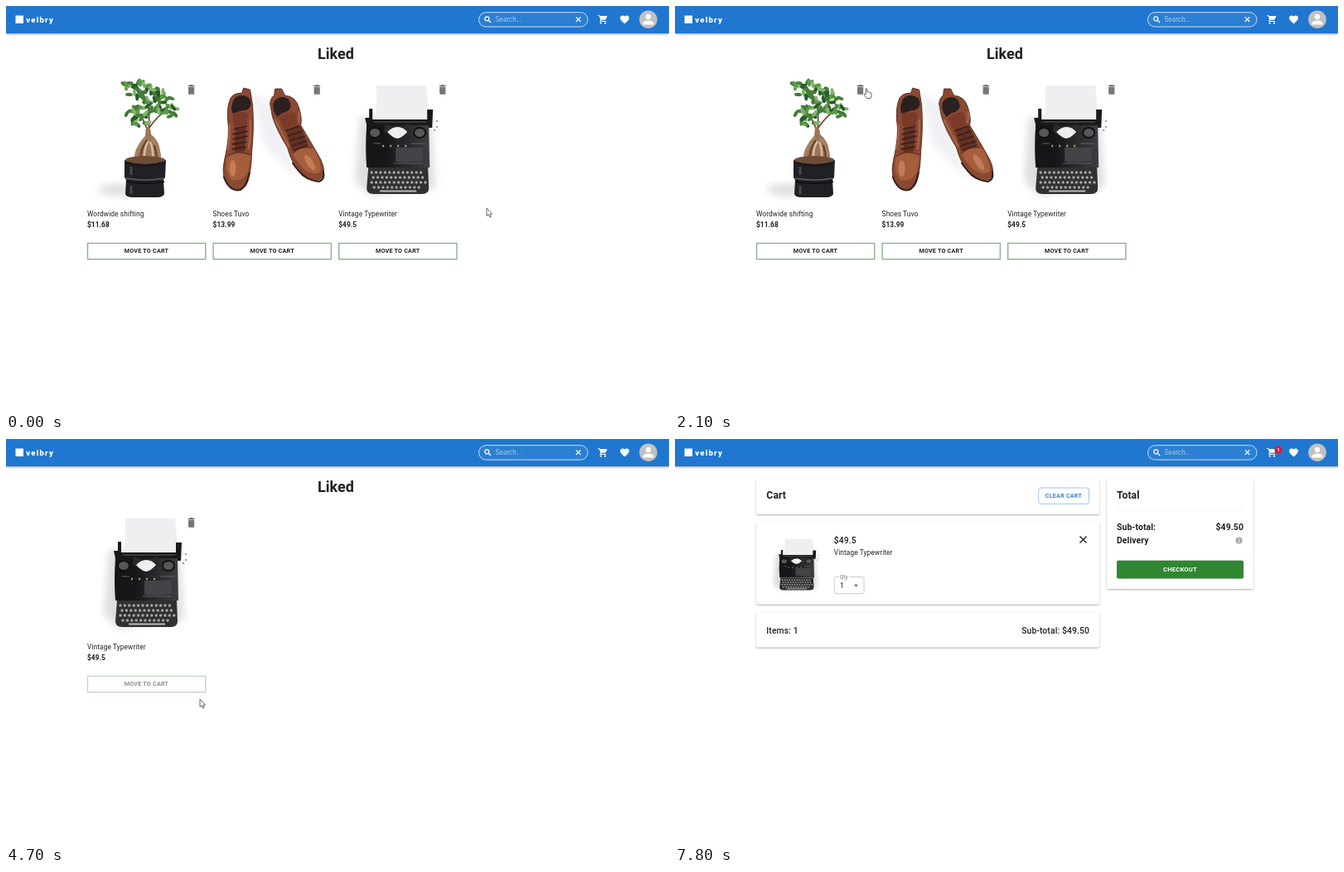
Write an HTML page that moves like this. It is 800x489 px and loops after 8400 ms.

```html
<!DOCTYPE html>
<html lang="en">
<head>
<meta charset="utf-8">
<title>Shop: liked items and cart</title>
<style>
html, body { margin: 0; width: 100%; height: 100%; overflow: hidden; background: #fff; }
svg { display: block; }
#stage { width: 100vw; height: 100vh; font-family: Roboto, sans-serif; fill: #212121; }
.name { font-size: 8.35px; letter-spacing: .09px; }
.price { font-size: 8.4px; font-weight: 700; letter-spacing: .05px; }
.btn { font-size: 7.2px; font-weight: 600; letter-spacing: .2px; text-anchor: middle; }
.h6 { font-size: 12.2px; font-weight: 700; letter-spacing: .1px; }
.sub { font-size: 10.4px; font-weight: 500; letter-spacing: .1px; }
.bold { font-weight: 700; }
.end { text-anchor: end; }
.paper { fill: #fff; filter: drop-shadow(0 1px 1px rgba(0, 0, 0, .32)); }
.photo { filter: blur(.5px); }
</style>
</head>
<body>
<svg id="stage" viewBox="0 0 800 489" preserveAspectRatio="none"></svg>
<script>
const LOOP = 8400, STEP = 100;
const CARD_X = 98, PITCH = 151.6;
const stage = document.getElementById('stage');

const text = (x, y, cls, str, extra = '') =>
  `<text x="${x}" y="${y}" class="${cls}" ${extra}>${str}</text>`;
const box = (x, y, w, h, extra) =>
  `<rect x="${x}" y="${y}" width="${w}" height="${h}" ${extra}/>`;
const path = (d, extra) => `<path d="${d}" ${extra}/>`;
const oval = (x, y, rx, ry, extra) =>
  `<ellipse cx="${x}" cy="${y}" rx="${rx}" ry="${ry}" ${extra}/>`;
const line = (d, color, width, extra = '') =>
  path(d, `fill="none" stroke="${color}" stroke-width="${width}" ${extra}`);

function random(seed) {
  return () => (seed = seed * 16807 % 2147483647) / 2147483647;
}

function leaves() {
  const rnd = random(77);
  const greens = ['#3f7a35', '#5b9a4a', '#2b5a2c', '#83b56c', '#457f3b'];
  const tufts = [[54, 9], [69, 8], [80, 17], [66, 25], [92, 18], [55, 39], [98, 35], [80, 36], [64, 45]];
  let out = '';
  for (let i = 0; i < 100; i++) {
    const [cx, cy] = tufts[i % tufts.length];
    const x = cx + (rnd() - .5) * 19, y = cy + (rnd() - .5) * 15;
    out += oval(0, 0, 4.4, 2.1, `fill="${greens[i % 5]}" transform="translate(${x.toFixed(1)} ${y.toFixed(1)}) rotate(${Math.round(rnd() * 180)})"`);
  }
  return out;
}

const plant = () =>
  oval(38, 131, 25, 7, 'fill="#ddd" filter="url(#soft)"') +
  line('M74 66Q72 48 57 33M74 62Q76 38 72 18M75 56Q84 42 97 34', '#77553b', 2) +
  leaves() +
  path('M71 55Q77 54 77 64Q87 72 88 84Q91 94 84 98H60Q55 92 59 82Q64 72 70 66Z', 'fill="#9b7656"') +
  line('M71 67Q61 77 58 94M77 69Q87 77 87 94', '#a98360', 3) +
  line('M74 72Q68 80 69 96M76 73Q80 82 79 95', '#d6bb9c', 2.5) +
  line('M72 71Q64 82 64 96M81 77Q84 86 84 95', '#5d402b', 2) +
  path('M45 95Q70 90 95 95L94 116L92 119L93 136Q91 140 85 140H55Q47 140 46 136L47 119L45 116Z', 'fill="#202124"') +
  oval(70, 95, 24, 5, 'fill="#6f4c36"') +
  line('M47 98Q70 105 93 98', '#17181b', 2.5) +
  line('M47 117Q70 121 93 117', '#5d5f63', 1.3) +
  line('M47 121Q70 125 93 121', '#101113', 2) +
  line('M53 103V113M53 126V136', '#46484c', 3);

const shoes = () =>
  path('M44 12L74 28L104 118L64 80Z', 'fill="#f0f0f4" filter="url(#soft)"') +
  path('M20 24Q22 14 35 14L37 8L45 10L48 29Q50 55 47 85Q46 118 39 127Q31 134 20 127Q9 117 14 95Q21 65 18 47Q17 32 20 24Z',
    'fill="#8a4932" stroke="#55291d" stroke-width=".9"') +
  path('M24 25Q27 16 36 17Q46 18 46 27Q44 36 36 35L24 39Q21 33 24 25Z', 'fill="#2b2020"') +
  path('M24 40Q34 34 43 39L41 54H25Z', 'fill="#7a3a29"') +
  path('M27 55L40 54L39 84L26 88Z', 'fill="#63301f"') +
  path('M17 91Q29 81 46 89L42 111Q34 122 23 119Q13 112 17 91Z', 'fill="#a55d3c"') +
  oval(24, 105, 4, 10, 'fill="#cf9068" opacity=".65"') +
  line('M20 52Q21 66 18 82M45 46Q46 66 43 82', '#a9654a', 2) +
  line('M25 58L41 54M24 64L42 60M24 70L42 66M23 76L41 73M23 82L40 79', '#3c2020', 1.8) +
  line('M17 91Q29 82 46 89', '#5c2d1f', 1.2) +
  line('M13 115Q20 134 33 131Q41 127 44 110', '#30221f', 2) +
  path('M69 27Q70 19 74 17L75 9L83 9L87 17Q100 18 104 32Q108 45 106 53Q120 76 130 94Q138 111 130 118Q121 123 108 114Q95 100 90 80Q77 59 72 43Z',
    'fill="#8a4931" stroke="#54271d" stroke-width=".9"') +
  path('M73 26Q77 18 86 19Q94 21 94 31Q91 38 84 38L78 43Q71 35 73 26Z', 'fill="#2b2121"') +
  path('M80 44Q90 36 99 38L102 53L86 58Z', 'fill="#7c3b29"') +
  path('M88 58L105 53L115 76L96 85Z', 'fill="#643022"') +
  path('M96 87Q105 77 120 79Q132 98 130 109Q121 115 110 106Q101 97 96 87Z', 'fill="#a65e3d"') +
  oval(117, 98, 4, 11, 'fill="#d0926b" opacity=".6" transform="rotate(-32 117 98)"') +
  line('M75 46Q82 60 92 79M104 36Q105 46 103 50', '#a9654a', 2) +
  line('M87 60L104 54M90 66L108 60M92 72L111 66M95 78L114 72M98 83L115 77', '#392020', 1.8) +
  line('M96 87Q105 78 120 80', '#5c2d1f', 1.2) +
  line('M96 98Q110 120 128 121Q136 118 133 108', '#30211f', 2);

// Key rows are dashed lines with round caps.
const keys = (x, y, w) =>
  line(`M${x} ${y}H${x + w}`, '#a5a5a3', 3.4, 'stroke-linecap="round" stroke-dasharray="0 5.4"');

const typewriter = () =>
  path('M26 44L111 36L117 128L38 138L20 120Z', 'fill="#d6d6d8" opacity=".8" filter="url(#soft)"') +
  path('M46 5H106L110 47H45Z', 'fill="#efeff2"') +
  path('M37 33H41V46H107V34H114L113 56H108V64H36L34 53L32 44H37Z', 'fill="#18191b"') +
  line('M43 49H106', '#5b5d60', 1.2) +
  path('M34 53H109L110 104H34Q32 80 34 53Z', 'fill="url(#metal)"') +
  path('M56 51Q70 58 85 51L86 61Q70 72 55 61Z', 'fill="#292a2c"') +
  path('M59 61Q65 55 71 55Q78 55 83 61Q77 68 71 69Q65 68 59 61Z', 'fill="#eeeeed"') +
  oval(44, 62, 7, 6, 'fill="#55585a" stroke="#111" stroke-width="2"') +
  oval(98, 62, 7, 6, 'fill="#55585a" stroke="#111" stroke-width="2"') +
  path('M69 80H102V96Q83 99 69 97Z', 'fill="#434447"') +
  line('M53 78H85', '#ad9b7b', 2.6, 'stroke-dasharray="2 7"') +
  line('M42 75H51M88 75H105M67 99H102', '#606164', 1) +
  path('M36 104H108L109 129Q109 136 101 136H42Q34 136 34 129Z', 'fill="#303133"') +
  keys(40, 110, 63) + keys(42, 116, 61) + keys(40, 122, 65) + keys(43, 128, 58) +
  line('M50 132.5H94', '#bbb', 2) +
  line('M118 48H120M118 55H120M115 59H117', '#777', 1.5);

const button = id =>
  `<g id="${id}">` + box(.5, 286.5, 142.3, 19.2, 'fill="#fff" stroke="#88b28a" stroke-width="1.4"') +
  text(71.5, 298.4, 'btn', 'MOVE TO CART') + '</g>';

const trash =
  box(122, 97.5, 7.2, 9.2, 'rx="1" fill="#777"') +
  path('M121.6 95.8H123.8L124.4 95H126.9L127.5 95.8H129.6V97.1H121.6Z', 'fill="#707070"');

const items = [
  { id: 'plant', name: 'Wordwide shifting', price: '$11.68', art: plant, until: 2600 },
  { id: 'shoes', name: 'Shoes Tuvo', price: '$13.99', art: shoes, until: 3500 },
  { id: 'typer', name: 'Vintage Typewriter', price: '$49.5', art: typewriter, until: 4900 }
];

const card = item =>
  `<g id="${item.id}"><g class="photo" transform="translate(0 91)">${item.art()}</g>` + trash +
  text(0, 253.8, 'name', item.name) + text(0, 266.5, 'price', item.price) +
  button(item.id + 'Btn') + '</g>';

const icon = (x, y, size, d) =>
  `<g transform="translate(${x} ${y}) scale(${size / 24})">${path(d, 'fill="#fff"')}</g>`;

const header =
  box(0, 0, 800, 33, 'fill="#2077cf" style="filter:drop-shadow(0 1px 1.5px rgba(0,0,0,.4))"') +
  box(11.5, 11.5, 9.5, 9.5, 'fill="#fff"') +
  text(24.3, 19.6, '', 'velbry', 'fill="#fff" font-size="9.6" font-weight="900" letter-spacing="1.15"') +
  box(570.5, 7.7, 131.5, 17.4, 'rx="8.7" fill="#2c7fd2" stroke="#c8def4" stroke-width="1"') +
  '<circle cx="580.3" cy="15.3" r="2.5" fill="none" stroke="#fff" stroke-width="1.2"/>' +
  line('M582.2 17.2L585 20', '#fff', 1.4) +
  text(590.5, 19, '', 'Search...', 'fill="#a5c9ec" font-size="8.2"') +
  line('M687.8 13.4L693.4 19M693.4 13.4L687.8 19', '#fff', 1.2) +
  icon(713.8, 9.8, 13, 'M7 18a2 2 0 1 0 0 4a2 2 0 1 0 0-4M1 2v2h2l3.6 7.6-1.4 2.4C4.5 15.4 5.5 17 7 17h12v-2H7.4L8.5 13H16c.8 0 1.4-.4 1.7-1L21.3 5.5C21.7 4.8 21.2 4 20.4 4H5.2L4.3 2zM17 18a2 2 0 1 0 0 4a2 2 0 1 0 0-4') +
  icon(740, 9.8, 13, 'M12 21.3L10.5 20C5.4 15.4 2 12.3 2 8.5C2 5.4 4.4 3 7.5 3C9.2 3 10.9 3.8 12 5.1C13.1 3.8 14.8 3 16.5 3C19.6 3 22 5.4 22 8.5C22 12.3 18.6 15.4 13.5 20Z') +
  '<circle cx="775" cy="16.2" r="10.8" fill="#c1c1c1"/>' +
  '<circle cx="775" cy="13" r="3.2" fill="#fff"/>' +
  path('M768.5 22.5V21Q769 17.5 775 17.5T781.5 21V22.5Z', 'fill="#fff"') +
  '<g id="badge"><circle cx="728" cy="13" r="4.6" fill="#d9193c"/>' +
  text(728, 15.2, 'bold', '1', 'fill="#fff" font-size="6" text-anchor="middle"') + '</g>';

const paper = (x, y, w, h) => box(x, y, w, h, 'rx="2" class="paper"');

const cart =
  paper(98, 48, 414, 43) + paper(98, 101, 414, 98.5) + paper(98, 209.5, 414, 42) + paper(521, 48, 177, 133) +
  text(110.3, 71.8, 'h6', 'Cart') +
  box(438.7, 59, 60.8, 19.3, 'rx="2.5" fill="#fff" stroke="#a1c4ea" stroke-width="1"') +
  text(469, 71.2, 'btn', 'CLEAR CART', 'fill="#3b85d2"') +
  `<g id="thumb" class="photo" transform="translate(107.5 118.5) scale(.55 .47)">${typewriter()}</g>` +
  text(191.8, 126, 'sub', '$49.5') + text(191.8, 139.5, 'name', 'Vintage Typewriter') +
  line('M488.5 117.5L496.5 125.5M496.5 117.5L488.5 125.5', '#222', 1.4) +
  box(192.2, 166.5, 35.8, 20.3, 'rx="2" fill="#fff" stroke="#c4c4c4" stroke-width=".9"') +
  box(197.5, 164, 13, 5, 'fill="#fff"') +
  text(199, 168.6, '', 'Qty', 'fill="#777" font-size="6.3"') +
  text(199, 179.6, '', '1', 'font-size="8.5"') +
  path('M215.9 175.8H221.1L218.5 178.4Z', 'fill="#666"') +
  text(110.3, 234.6, 'sub', 'Items: 1') + text(500, 234.6, 'sub end', 'Sub-total: $49.50') +
  text(533, 71.8, 'h6', 'Total') +
  line('M533 86.5H686', '#eee', .8) +
  text(533, 109.5, 'sub bold', 'Sub-total:') + text(686, 109.5, 'sub bold end', '$49.50') +
  text(533, 126, 'sub bold', 'Delivery') +
  '<circle cx="680.5" cy="122.5" r="4.1" fill="#aaa"/>' +
  line('M680.5 122V124.8M680.5 120.1V121', '#fff', .9) +
  box(533, 146.8, 153, 21.7, 'rx="2" fill="#318632" style="filter:drop-shadow(0 .7px .7px rgba(0,0,0,.35))"') +
  text(609.5, 160, 'btn', 'CHECKOUT', 'fill="#fff" style="font-size:7.6px"');

const cursors =
  `<g id="arrow">${path('M0 0V9.5L2.2 7.7L3.8 11L5.3 10.3L3.8 7.1H6.5Z', 'fill="#fff" stroke="#555" stroke-width=".9"')}</g>` +
  `<g id="hand">${path('M2.2 7.8V1.2Q3 -.3 3.9 1.2V5Q5 4.2 5.6 5.3Q6.7 4.7 7.3 5.8Q9 5.3 9 7V10L8 12.5H3.5L.4 8.3Q-.1 6.8 1.2 7Z', 'fill="#fff" stroke="#555" stroke-width=".9"')}</g>` +
  `<g id="beam">${line('M-2 -5Q0 -5 0 -4Q0 -5 2 -5M0 -4V4M-2 5Q0 5 0 4Q0 5 2 5', '#222', 1.1)}</g>`;

stage.innerHTML =
  '<defs><filter id="soft" x="-40%" y="-40%" width="180%" height="180%"><feGaussianBlur stdDeviation="5"/></filter>' +
  '<linearGradient id="metal"><stop offset=".3" stop-color="#151618"/><stop offset="1" stop-color="#3d3e41"/></linearGradient></defs>' +
  `<g id="liked">${text(398, 63.5, '', 'Liked', 'font-size="18" font-weight="700" text-anchor="middle"')}${items.map(card).join('')}</g>` +
  `<g id="cart">${cart}</g>` + header + `<g id="pointer">${cursors}</g>`;

const el = id => document.getElementById(id);
const show = (id, on) => el(id).setAttribute('display', on ? 'inline' : 'none');

// Pointer stops: time, x, y
const track = [
  [0, 580, 244], [300, 580, 244], [400, 583, 247], [600, 612, 203], [800, 650, 207],
  [1000, 659, 209], [1300, 659, 209], [1500, 590, 190], [1700, 420, 150], [1900, 250, 104],
  [2100, 228, 99], [2600, 228, 99], [2900, 223, 125], [3100, 224, 102], [3600, 224, 102],
  [4000, 226, 200], [4300, 226, 292], [4500, 228, 297], [4700, 234, 314], [4800, 393, 364],
  [5000, 680, 395], [5200, 708, 300], [5500, 722, 40], [5700, 720, 16], [5900, 720, 16],
  [6200, 678, 147], [6400, 740, 180], [6600, 796, 190], [LOOP, 796, 190]
];

// Pointer shapes: from time
const shapes = [
  [0, 'arrow'], [2000, 'hand'], [3800, 'arrow'], [4200, 'hand'], [4500, 'arrow'],
  [5500, 'hand'], [6000, 'arrow'], [6200, 'beam'], [6300, 'arrow'], [6700, '']
];

function pointerAt(t) {
  const i = track.findIndex(p => p[0] > t);
  const [t0, x0, y0] = track[i - 1], [t1, x1, y1] = track[i];
  const k = (t - t0) / (t1 - t0);
  return [x0 + (x1 - x0) * k, y0 + (y1 - y0) * k];
}

function draw(t) {
  const inCart = t >= 6000;
  show('liked', !inCart);
  show('cart', inCart);
  show('badge', t >= 4900);

  let slot = 0;
  for (const { id, until } of items) {
    show(id, t < until);
    if (t < until) el(id).setAttribute('transform', `translate(${CARD_X + PITCH * slot++} 0)`);
  }
  el('typerBtn').setAttribute('opacity', t >= 4500 ? .5 : 1);
  el('thumb').setAttribute('opacity', Math.max(0, Math.min(1, (t - 6000) / 450)));

  const shape = shapes.filter(s => s[0] <= t).pop()[1];
  for (const name of ['arrow', 'hand', 'beam']) show(name, name === shape);
  el('pointer').setAttribute('transform', `translate(${pointerAt(t).join(' ')})`);
}

const start = performance.now();
function tick() {
  const t = (performance.now() - start) % LOOP;
  draw(Math.floor(t / STEP) * STEP);
  requestAnimationFrame(tick);
}
tick();
</script>
</body>
</html>
```
